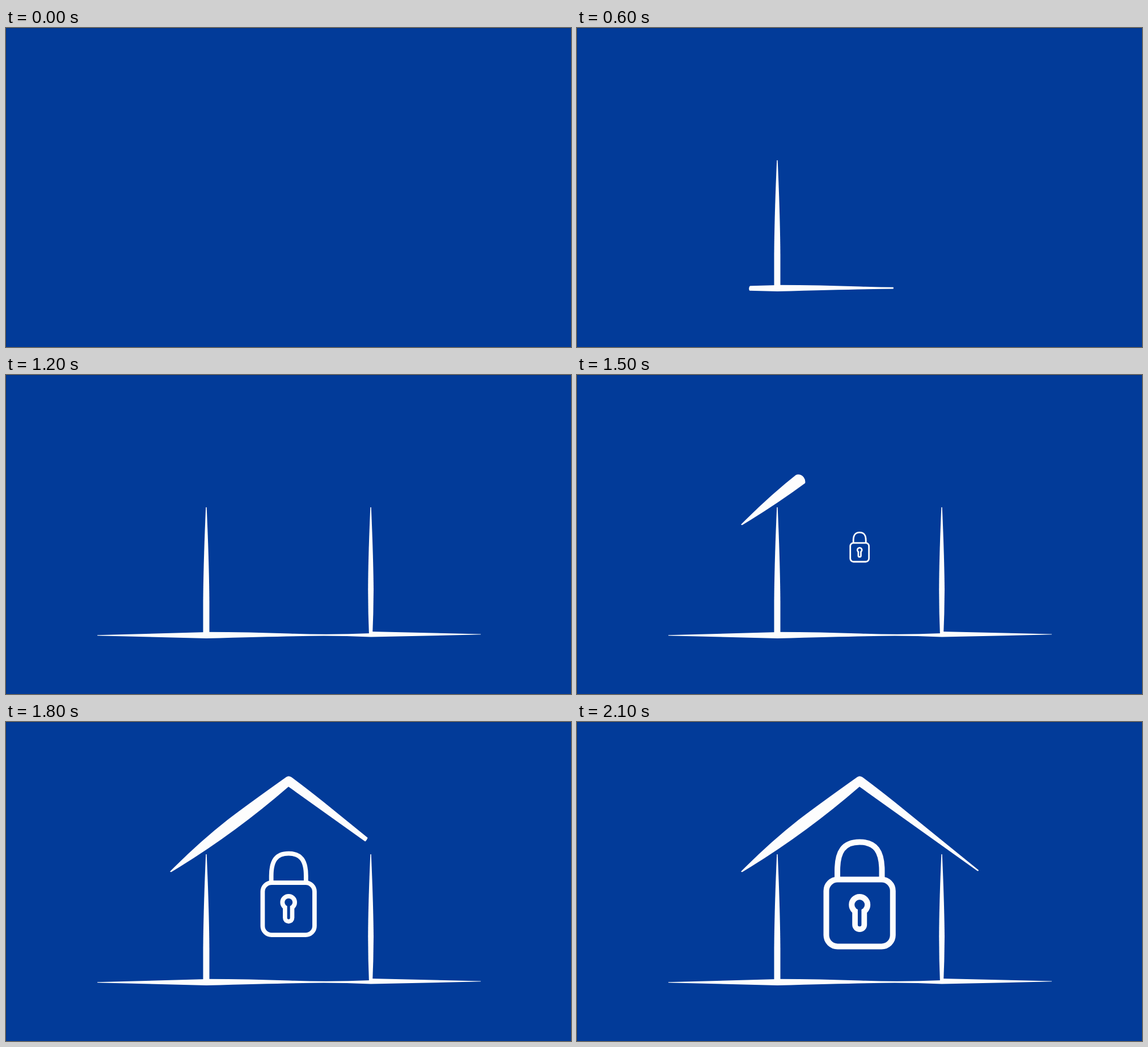
An HTML page that plays this animation: 996 px wide and 562 px high, repeating every 3000 ms.

```html
<!DOCTYPE html>
<html lang="en">
<head>
<meta charset="utf-8">
<title>Safe house</title>
<style>
  html, body { margin: 0; width: 100%; height: 100%; overflow: hidden; background: #023b99; }
  svg { display: block; width: 100vw; height: 100vh; }
</style>
</head>
<body>
<svg viewBox="0 0 996 562">
  <path d="M0 .5H996M.5 0V562" stroke="#03347f" fill="none"/>
  <g id="house" fill="#fdfdfd"></g>
  <g id="lock" fill="none" stroke="#fdfdfd" stroke-width="10" stroke-linecap="round">
    <rect x="439.5" y="277.5" width="117.3" height="118" rx="20"/>
    <path d="M459 275V262C459 228 470 211.5 498.2 211.5S537.5 228 537.5 262V275" stroke-linecap="butt"/>
    <circle cx="498.2" cy="322" r="14"/>
    <path d="M498.2 322V357" stroke-width="26"/>
    <circle cx="498.2" cy="322" r="9" fill="#023b99" stroke="none"/>
    <path d="M498.2 322V357" stroke="#023b99" stroke-width="6.5"/>
  </g>
</svg>
<script>
const LOOP = 3000, STEP = 100;
const house = document.getElementById('house');
const lock = document.getElementById('lock');

// Each brush stroke: outline, line along which it is drawn, brush width, start and end in ms
const strokes = [
  { shape: 'M352.3 233Q348 330 347.5 400V460H358.5V400Q358 330 353.7 233Z',
    line: 'M353 232V463', width: 14, from: 150, to: 470 },
  { shape: 'M161 458.3L353 453V464L161 459.2Z',
    line: 'M353 459H160', width: 14, from: 385, to: 1018 },
  { shape: 'M353 452.7Q430 453 500 455.5T643 455V461.5Q600 459.5 560 459.5Q500 460 353 464Z',
    line: 'M353 458H645', width: 14, from: 385, to: 725 },
  { shape: 'M643 452L837 456.4V457.3L643 461.5Z',
    line: 'M643 457H838', width: 11, from: 710, to: 1190 },
  { shape: 'M642.3 233Q638.5 320 638.2 378Q638.3 420 640 460H646Q647.8 420 648 378Q647.5 320 643.7 233Z',
    line: 'M643 460V232', width: 14, from: 690, to: 954 },
  { shape: 'M289 263.5Q340 212 391 172Q425 146 494 97Q498 94 503 97Q530 117 560 141L708 261Q708 263 706 262.5L498 114Q400 199 291 264.5Z',
    line: 'M289 265L498 105L709 263', width: 26, from: 1230, to: 2015 },
];

function make(tag, attrs, parent) {
  const el = document.createElementNS('http://www.w3.org/2000/svg', tag);
  for (const key in attrs) el.setAttribute(key, attrs[key]);
  return parent.appendChild(el);
}

strokes.forEach((s, i) => {
  const mask = make('mask', {
    id: 'm' + i, maskUnits: 'userSpaceOnUse', x: 0, y: 0, width: 996, height: 562
  }, house);
  s.brush = make('path', {
    d: s.line, fill: 'none', stroke: '#fff', 'stroke-width': s.width,
    'stroke-linecap': 'round', 'stroke-linejoin': 'round'
  }, mask);
  s.length = s.brush.getTotalLength();
  s.fill = make('path', { d: s.shape, mask: `url(#m${i})` }, house);
});

// Sine ease in and out
function ease(t, from, to) {
  const x = Math.min(1, Math.max(0, (t - from) / (to - from)));
  return (1 - Math.cos(Math.PI * x)) / 2;
}

function draw() {
  const t = Math.floor(performance.now() % LOOP / STEP) * STEP;
  for (const s of strokes) {
    const p = ease(t, s.from, s.to);
    const dash = Math.max(.01, p * s.length - s.width / 2);
    s.fill.style.display = p > 0 ? '' : 'none';
    s.brush.setAttribute('stroke-dasharray', `${dash} 2000`);
  }
  const scale = ease(t, 1180, 2080);
  lock.style.display = scale > 0 ? '' : 'none';
  lock.setAttribute('transform', `translate(498.2 303) scale(${scale}) translate(-498.2 -303)`);
  requestAnimationFrame(draw);
}
draw();
</script>
</body>
</html>
```
